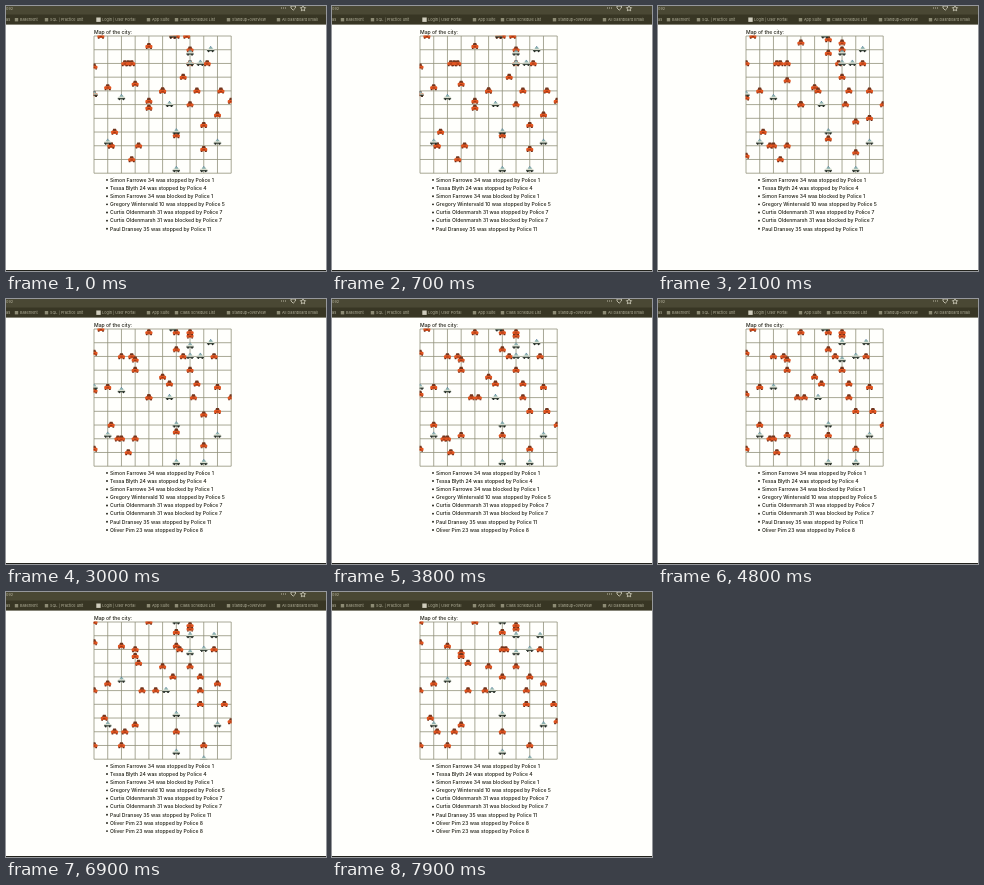
An HTML page that plays this animation: 320x265 px, repeating every 8000 ms.

```html
<!DOCTYPE html>
<html lang="en">
<head>
<meta charset="utf-8">
<title>Map of the city</title>
<style>
  html, body { margin: 0; width: 100%; height: 100%; overflow: hidden; background: #fffffc; }
  svg { display: block; width: 100vw; height: 100vh; }
  text { font-family: Inter, "Liberation Sans", sans-serif; font-size: 5.1px; font-weight: 500; fill: #1e1e14; }
  .bar text { font-size: 3.8px; font-weight: 400; fill: #b4b29c; }
</style>
</head>
<body>
<svg viewBox="0 0 320 265" preserveAspectRatio="none">
  <defs>
    <clipPath id="edge"><rect x="87.6" y="29.6" width="138" height="137.8"/></clipPath>
    <g id="car">
      <path d="M-2.3-.4L-1.4-3H1.4L2.3-.4Z" fill="#73351d"/>
      <rect x="-3.5" y="-.9" width="7" height="3.2" rx="1" fill="#e2541f"/>
      <path d="M-3 1.9h1.7v1.1H-3zM1.3 1.9H3v1.1H1.3z" fill="#6b2c18"/>
      <path d="M-1.2.8H1.2" stroke="#8c3217" stroke-width=".8"/>
    </g>
    <g id="cop">
      <path d="M-2-.5L-1.2-2.4H1.3L2.3-.5Z" fill="#8db3b0"/>
      <rect x="-.6" y="-3.2" width="1.2" height=".9" fill="#5b7fa0"/>
      <rect x="-3.7" y="-.6" width="7.4" height="1.5" rx=".6" fill="#d9ddd0"/>
      <rect x="-3.7" y=".6" width="7.4" height="1.2" fill="#3f4d42"/>
      <circle cx="-2" cy="1.9" r=".9" fill="#262a24"/>
      <circle cx="2" cy="1.9" r=".9" fill="#262a24"/>
    </g>
  </defs>
  <rect width="320" height="265" fill="#fffffc"/>
  <g class="bar">
    <rect width="320" height="18.6" fill="#383624"/>
    <rect width="320" height="8.5" fill="#4a4834"/>
    <text x="0" y="3.6">092</text>
    <g fill="none" stroke="#d8d6c4" stroke-width=".8">
      <path d="M275 2h5" stroke-dasharray="1 1"/>
      <path d="M285 0v2l2.2 2.2L289.4 2V0z"/>
      <path d="M297 0l.8 1.5 1.8.2-1.3 1.3.4 1.8-1.7-.9-1.7.9.4-1.8-1.3-1.3 1.8-.2z"/>
    </g>
    <text x="0" y="15.1">as</text>
    <g id="tabs"></g>
  </g>
  <path d="M0 264.5H320" stroke="#22221c"/>
  <text x="88" y="27.8">Map of the city:</text>
  <path id="grid" fill="none" stroke="#92927c" stroke-width=".8"/>
  <g id="town" clip-path="url(#edge)"></g>
  <g id="log"></g>
</svg>
<script>
const LOOP = 8000, STEP = 3.43, LEFT = 88, TOP = 30;
const $ = id => document.getElementById(id);

function add(parent, tag, attrs, text = "") {
  const el = document.createElementNS("http://www.w3.org/2000/svg", tag);
  for (const k in attrs) el.setAttribute(k, attrs[k]);
  el.textContent = text;
  parent.append(el);
  return el;
}

let lines = "";
for (let i = 0; i <= 40; i += 4)
  lines += `M${LEFT + i * STEP} ${TOP}v137.2M${LEFT} ${TOP + i * STEP}h137.2`;
$("grid").setAttribute("d", lines);

[[14, "Basement"], [44, "SQL | Practice unit"], [96, "Login | User Portal"], [146, "App Suite"],
 [174, "Class Schedule List"], [226, "Standup+overview"], [276, "All Dashboard Email"]]
  .forEach(([x, label], i) => {
    const r = i == 2 ? 2.2 : 1.7;
    add($("tabs"), "rect", { x: x - 3.5 - r, y: 13.7 - r, width: 2 * r, height: 2 * r, fill: i == 2 ? "#d0cdbd" : "#8d8b74" });
    add($("tabs"), "text", { x, y: 15.1 }, label);
  });

const log = [
  "Simon Farrowe 34 was stopped by Police 1",
  "Tessa Blyth 24 was stopped by Police 4",
  "Simon Farrowe 34 was blocked by Police 1",
  "Gregory Wintervald 10 was stopped by Police 5",
  "Curtis Oldenmarsh 31 was stopped by Police 7",
  "Curtis Oldenmarsh 31 was blocked by Police 7",
  "Paul Dransey 35 was stopped by Police 11",
  "Oliver Pim 23 was stopped by Police 8",
  "Oliver Pim 23 was stopped by Police 8"
].map((text, i) => {
  const row = add($("log"), "g", { transform: `translate(0 ${175.7 + i * 8.15})` });
  add(row, "circle", { cx: 101, cy: -1.8, r: .95, fill: "#1e1e14" });
  add(row, "text", { x: 104, y: 0 }, text);
  return { row, from: [0, 0, 0, 0, 0, 0, 0, 3000, 5600][i] };
});

// Start in quarter blocks, then the moves of each round.
const cars = `2,0 - - LL -|16,3 U U U -|28,4 - UU - -|24,0 DDDDD D D D|27,0 RDD U - -
23,0 RD - DD -|26,12 RR - D -|28,8 L L L -|10,8 L L U -|9,8 R R R D|11,8 R D D -|33,8 R R - -
0,9 U U U -|12,14 U U R R|4,15 D D D -|20,16 U U U -|20,16 R R R R|30,16 - - R R
37,16 L D D -|16,19 D R R R|16,21 U L L -|28,20 R R R -|36,23 D R R R
40,19 D RRRR - -|44,28 - LLLL D -|32,26 U U L -|6,28 L L L -|24,29 D D D -|32,33 D D D -
5,32 RR R R R|5,32 RRR L L L|13,32 L U U -|11,36 L L L -|-2,35 RR - D -|0,17 D D D -`;
const cops = `34,4 R|28,5 U|28,8 D|31,8 R|0,17 LLL|8,18 U|22,20 L|24,28 U|4,31 U|36,31 U|24,39 U|32,39 D|23,0 R`;
const dirs = { L: [-1, 0], R: [1, 0], U: [0, -1], D: [0, 1] };

// Vehicles take turns within a round; each hop happens at once.
function fleet(spec, shape, rounds) {
  return spec.split(/[|\n]/).map((line, i, all) => {
    const [start, ...moves] = line.split(" ");
    const hops = moves.flatMap((word, r) => word == "-" ? [] : [...word].map((c, j) => {
      const [a, b] = rounds[r];
      return { at: a + (b - a) * (i + j / word.length) / all.length, dir: dirs[c] };
    }));
    return { start: start.split(",").map(Number), hops, el: add($("town"), "use", { href: "#" + shape }) };
  });
}
const vehicles = [
  ...fleet(cars, "car", [[750, 2080], [2130, 3780], [5820, 6880], [6920, 7880]]),
  ...fleet(cops, "cop", [[3850, 5750]])
];

function draw() {
  const t = performance.now() % LOOP;
  for (const { start, hops, el } of vehicles) {
    let [x, y] = start;
    for (const { at, dir } of hops)
      if (t >= at) { x += dir[0]; y += dir[1]; }
    el.setAttribute("transform", `translate(${LEFT + x * STEP} ${TOP - .3 + y * STEP})`);
  }
  for (const { row, from } of log) row.style.display = t >= from ? "" : "none";
  requestAnimationFrame(draw);
}
draw();
</script>
</body>
</html>
```
